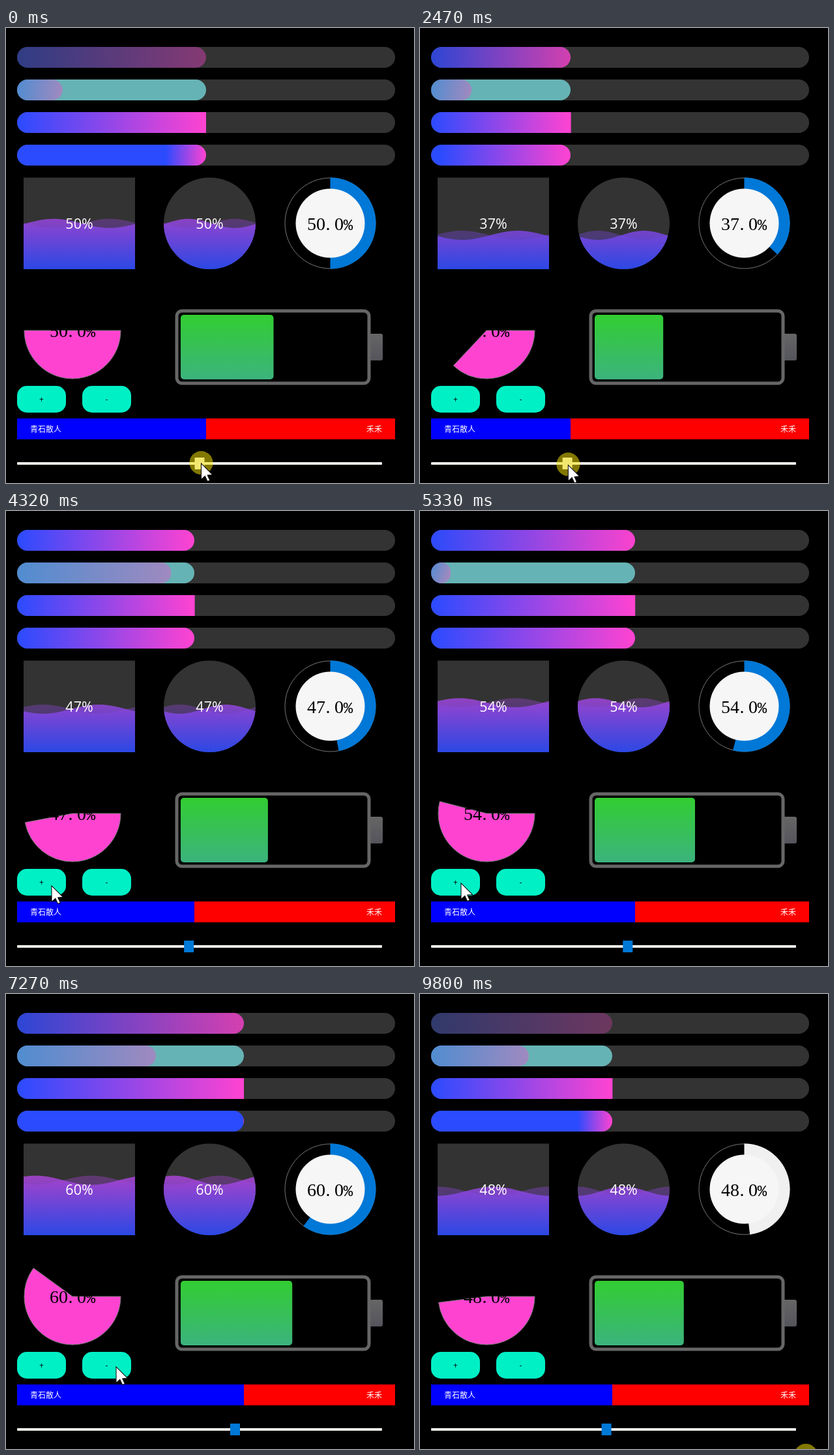
An HTML page with a canvas that plays this animation: 626 px wide and 698 px high, repeating every 9880 ms.

```html
<!DOCTYPE html>
<html lang="zh">
<head>
<meta charset="utf-8">
<title>Progress indicators</title>
<style>
html, body { margin: 0; width: 100%; height: 100%; overflow: hidden; background: #000; }
canvas { display: block; }
</style>
</head>
<body>
<canvas id="stage" width="626" height="698"></canvas>
<script>
const ctx = document.getElementById('stage').getContext('2d');
const LOOP = 9880, TAU = Math.PI * 2;
const BLUE = '#2b4bff', PINK = '#ff43d1', GREY = '#333', ACCENT = '#0078d7';

// Drag the slider, click plus, click minus, then click outside
const STEP = 145, RELEASE = 2530, UP = 2780, DOWN = 6860, BLUR = 9700;

// Pointer trips: start, duration, destination
const TRIPS = [[RELEASE, 450, 70, 575], [4350, 350, 63, 571], [6450, 350, 169, 572], [9010, 590, 592, 709]];

// Wave crest position in widths: [time, crest]
const CREST = [[0, .27], [1080, 1.25], [2470, 1.72], [6350, 3.72], [8110, 4.46], [LOOP, 5.55]];

const clamp = u => Math.min(1, Math.max(0, u));
const mix = (a, b, u) => a + (b - a) * u;
const smooth = u => u * u * (3 - 2 * u);

function drag(t) {
  return .5 + .42 * smooth(clamp(t / 800)) - .55 * clamp((t - 984) / 880);
}

function progress(t) {
  if (t < UP) return Math.round(drag(t) * 100) / 100;
  if (t < DOWN) return Math.min(62, 37 + Math.floor((t - UP) / STEP)) / 100;
  return Math.max(48, 62 - Math.floor((t - DOWN) / STEP)) / 100;
}

// Slow glow: rises to full, then fades
function glow(t) {
  const d = t - 4320;
  return d < 0 ? 1 - .6 * (-d / 4320) ** 1.2 : 1 - .72 * (d / 5480) ** 2;
}

// Gradient stop sliding from the right end to the left
function blueStop(t) {
  const age = (t + LOOP - 6990) % LOOP;
  return 1 / (1 + Math.exp((age - 3700) / 620));
}

// Distance run by the highlight, restarting every 3.2 s
function sweep(t) {
  const age = t < 1810 ? t + 740 : (t - 1810) % 3200;
  return Math.max(1, age * .0942);
}

function crestAt(t) {
  const n = CREST.findIndex(k => k[0] > t);
  const [t0, a] = CREST[n - 1], [t1, b] = CREST[n];
  return mix(a, b, (t - t0) / (t1 - t0));
}

function gradient(x0, y0, x1, y1, ...stops) {
  const g = ctx.createLinearGradient(x0, y0, x1, y1);
  stops.forEach(([p, c]) => g.addColorStop(p, c));
  return g;
}

function box(x, y, w, h, r, fill, alpha = 1) {
  ctx.globalAlpha = alpha;
  ctx.fillStyle = fill;
  ctx.beginPath();
  ctx.roundRect(x, y, w, h, r);
  ctx.fill();
  ctx.globalAlpha = 1;
}

function disc(x, y, r, fill) {
  ctx.fillStyle = fill;
  ctx.beginPath();
  ctx.arc(x, y, r, 0, TAU);
  ctx.fill();
}

function label(s, x, y, font, fill, align = 'center') {
  ctx.font = font;
  ctx.fillStyle = fill;
  ctx.textAlign = align;
  ctx.fillText(s, x, y);
}

// Fixed-pitch serif readout, one 14px cell per character
function readout(p, cx, y) {
  const s = (p * 100).toFixed(1) + '%';
  [...s].forEach((c, i) => {
    const x = cx - 35 + i * 14 + (c === '.' ? 4 : 7);
    label(c, x, y, c === '%' ? '24px "Liberation Mono", monospace' : '28px "Liberation Serif", serif', '#000');
  });
}

function bars(t, p) {
  const full = 580 * p, w = Math.floor(full);
  for (let i = 0; i < 4; i++) box(17, 29 + 50 * i, 580, 32, 16, GREY);
  const blend = gradient(17, 0, 17 + w, 0, [0, BLUE], [1, PINK]);
  box(17, 29, w, 32, 16, blend, glow(t));

  box(17, 79, w, 32, 16, '#66b3b5');
  const c = Math.min(w, sweep(t));
  box(17, 79, c, 32, 16, gradient(17, 79, 17 + c, 89, [0, BLUE], [1, PINK]), .37);

  box(17, 129, full, 32, [16, 0, 0, 16], blend);
  box(17, 179, w, 32, 16, gradient(17, 0, 17 + w, 0, [0, BLUE], [blueStop(t), BLUE], [1, PINK]));
}

function wave(x, w, level, crest, alpha) {
  ctx.globalAlpha = alpha;
  ctx.fillStyle = gradient(0, 230, 0, 370, [0, PINK], [1, BLUE]);
  ctx.beginPath();
  ctx.moveTo(x, 370);
  for (let i = 0; i <= w; i++) {
    ctx.lineTo(x + i, level - 7 * Math.cos(TAU * (i / w - crest)));
  }
  ctx.lineTo(x + w, 370);
  ctx.fill();
  ctx.globalAlpha = 1;
}

// The liquid follows the value 80 ms late
function tank(t, x, w, radius) {
  const p = progress(t - 80), level = 370 - 140.5 * p, crest = crestAt(t);
  ctx.save();
  ctx.beginPath();
  ctx.roundRect(x, 229.5, w, 140.5, radius);
  ctx.clip();
  ctx.fillStyle = GREY;
  ctx.fillRect(x, 229, w, 142);
  wave(x, w, level, crest + .5, .35);
  wave(x, w, level, crest, .8);
  ctx.restore();
  label(Math.round(p * 100) + '%', x + w / 2, 308, '21.5px "Open Sans", sans-serif', '#fff');
}

function ring(t, p) {
  const x = 497.5, y = 299.5;
  ctx.strokeStyle = '#777';
  ctx.lineWidth = 1;
  ctx.beginPath();
  ctx.arc(x, y, 69.5, 0, TAU);
  ctx.stroke();
  ctx.fillStyle = t < BLUR ? ACCENT : '#f0f0f0';
  ctx.beginPath();
  ctx.moveTo(x, y);
  ctx.arc(x, y, 70, -TAU / 4, TAU * (p - .25));
  ctx.fill();
  disc(x, y, 53, '#f6f6f6');
  readout(p, 497, 310);
}

function pie(p) {
  ctx.fillStyle = PINK;
  ctx.strokeStyle = '#777';
  ctx.lineWidth = 1;
  ctx.beginPath();
  ctx.moveTo(102, 464);
  ctx.arc(102, 464, 74, 0, TAU * p);
  ctx.closePath();
  ctx.fill();
  ctx.stroke();
  readout(p, 102, 474);
}

function battery(p) {
  box(556, 469, 22, 41, 3, gradient(0, 469, 0, 510, [0, '#666'], [1, '#54545c']));
  ctx.strokeStyle = '#666';
  ctx.lineWidth = 5;
  ctx.beginPath();
  ctx.roundRect(262, 434, 295, 111, 8);
  ctx.stroke();
  box(268, 440, 287 * p - 1, 99, 5, gradient(0, 440, 0, 539, [0, '#32cd32'], [1, '#3cb37d']));
}

function controls(t, p) {
  ['+', '-'].forEach((s, i) => {
    box(17 + 100 * i, 549, 75, 41, 15, '#00f0c6');
    label(s, 54.5 + 100 * i, 574, '12px "Open Sans", sans-serif', '#000');
  });

  box(17, 599, 580, 32, 0, '#f00');
  box(17, 599, Math.floor(580 * p), 32, 0, '#00f');
  const font = '12px "Noto Sans CJK SC", "Noto Sans CJK", sans-serif';
  label('青石散人', 37, 620, font, '#fff', 'left');
  label('禾禾', 577, 620, font, '#fff', 'right');

  box(17, 666, 560, 4, 1, '#f1efe9');
  box(17 + 545 * p, 659, 15, 18, 0, t < RELEASE ? '#e6e6e6' : ACCENT);
}

function pointer(t) {
  const held = Math.min(t, RELEASE);
  let x = 22 + 555 * drag(held);
  let y = 668 + 9 * Math.sin(Math.PI * held / 2700);
  for (const [start, time, toX, toY] of TRIPS) {
    const u = smooth(clamp((t - start) / time));
    x = mix(x, toX, u);
    y = mix(y, toY, u);
  }
  if (t < RELEASE || t >= BLUR) disc(x, y - 1, 18, 'rgba(255,236,0,.51)');

  ctx.save();
  ctx.translate(x, y);
  ctx.scale(1.45, 1.45);
  ctx.beginPath();
  [[0, 0], [0, 17], [4, 13.3], [6.6, 19], [9.2, 18], [6.7, 12.4], [12, 12]]
    .forEach(q => ctx.lineTo(...q));
  ctx.closePath();
  ctx.fillStyle = '#fff';
  ctx.strokeStyle = '#000';
  ctx.lineWidth = .7;
  ctx.fill();
  ctx.stroke();
  ctx.restore();
}

function draw(now) {
  const t = now % LOOP, p = progress(t);
  ctx.fillStyle = '#000';
  ctx.fillRect(0, 0, 626, 698);
  bars(t, p);
  tank(t, 27, 171, 0);
  tank(t, 242, 141, 70.25);
  ring(t, p);
  pie(p);
  battery(p);
  controls(t, p);
  pointer(t);
}

const origin = performance.now();
function tick() {
  draw(performance.now() - origin);
  requestAnimationFrame(tick);
}
tick();
</script>
</body>
</html>
```
